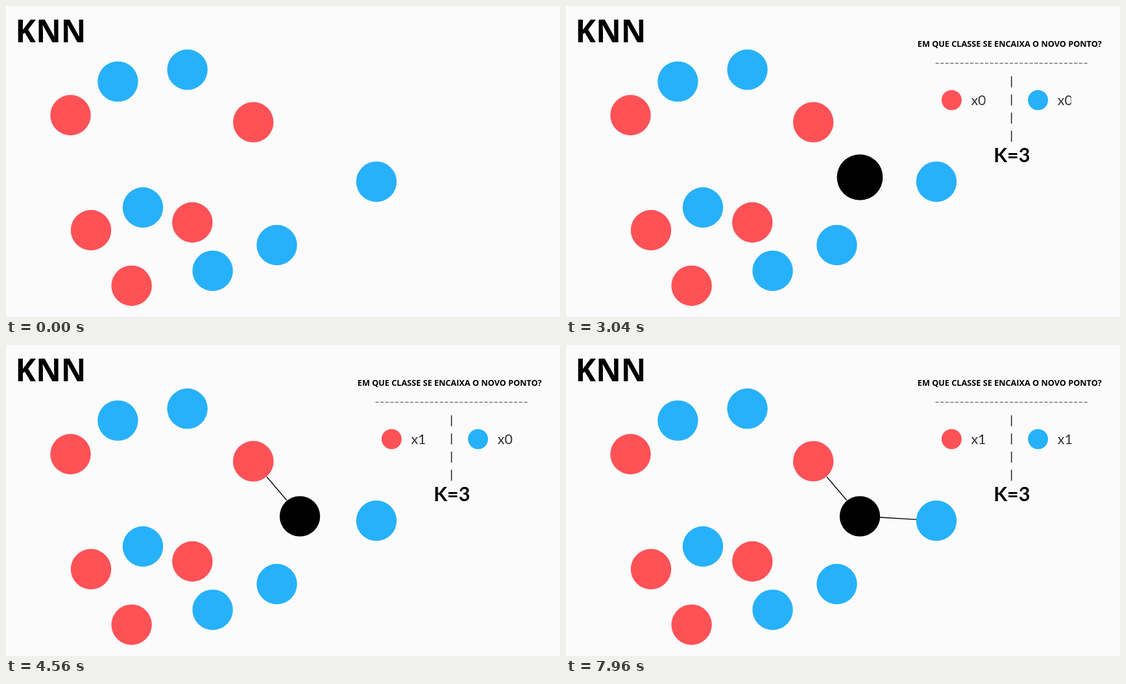
Recreate the animation shown at these times as an HTML page with a canvas. Size 854 by 480 pixels, loop 8 s.

```html
<!DOCTYPE html>
<html lang="pt">
<head>
<meta charset="utf-8">
<title>KNN</title>
<style>
html, body { margin: 0; width: 100%; height: 100%; overflow: hidden; background: #fbfbfb; }
canvas { display: block; }
</style>
</head>
<body>
<canvas id="stage" width="854" height="480"></canvas>
<script>
const ctx = document.getElementById('stage').getContext('2d');
const LOOP = 8000, R = 31.2, RED = '#ff5257', BLUE = '#27b1fb';
const ASK = 1920, FIRST = 4000, SECOND = 5920;
const reds = [[99.5, 168.5], [131, 346], [287.3, 334], [193.6, 431.7]];
const blues = [[172.4, 116.6], [279.6, 98.3], [211, 311], [318.6, 408.7], [417.5, 369]];

const clamp = v => Math.min(1, Math.max(0, v));
const easeOut = (t, start, length) => 1 - (1 - clamp((t - start) / length)) ** 3;

// Quick swell, then a decelerating return to the resting radius
function pulse(t, start) {
  const dt = t - start;
  if (dt < 0) return R;
  return R + 8.8 * (dt < 80 ? 0.5 + dt / 160 : (1 - clamp((dt - 80) / 560)) ** 2);
}

function disc(x, y, r, color) {
  ctx.fillStyle = color;
  ctx.beginPath();
  ctx.arc(x, y, r, 0, 7);
  ctx.fill();
}

function line(x1, y1, x2, y2, color, width, dash = []) {
  ctx.strokeStyle = color;
  ctx.lineWidth = width;
  ctx.setLineDash(dash);
  ctx.beginPath();
  ctx.moveTo(x1, y1);
  ctx.lineTo(x2, y2);
  ctx.stroke();
}

function text(str, x, y, font, align = 'left', color = '#000') {
  ctx.font = font;
  ctx.textAlign = align;
  ctx.fillStyle = color;
  ctx.fillText(str, x, y);
}

// Reveals a drawing from left to right
function wipe(t, start, x, width, paint) {
  if (t <= start) return;
  ctx.save();
  ctx.beginPath();
  ctx.rect(x, 0, width * easeOut(t, start, 1000), 480);
  ctx.clip();
  paint();
  ctx.restore();
}

const count = (n, x) => text('x' + n, x, 153, '21.5px Lato, sans-serif', 'center', '#333');

function panel(t) {
  text('EM QUE CLASSE SE ENCAIXA O NOVO PONTO?', 541.8, 63, 'bold 12.7px "Open Sans", sans-serif');
  text('K=3', 687.3, 241, 'bold 30.5px Lato, sans-serif', 'center');
  line(686.7, 108.5, 686.7, 209.5, '#333', 1.6, [17, 11]);
  wipe(t, 2110, 569.5, 235, () => line(569.5, 88.4, 804, 88.4, '#666', 1.4, [5.2, 2.43]));
  wipe(t, 2220, 578.5, 32, () => disc(594.4, 145.2, 15.5, RED));
  wipe(t, 2330, 711.8, 32, () => disc(727.6, 145.2, 15.5, BLUE));
  wipe(t, 2430, 623.5, 24.5, () => count(t < FIRST ? 0 : 1, 636));
  wipe(t, 2530, 757, 24.5, () => count(t < SECOND ? 0 : 1, 769.3));
}

function draw(t) {
  ctx.fillStyle = '#fbfbfb';
  ctx.fillRect(0, 0, 854, 480);
  text('KNN', 14.6, 56.3, 'bold 47.5px "Open Sans", sans-serif');
  reds.forEach(([x, y]) => disc(x, y, R, RED));
  blues.forEach(([x, y]) => disc(x, y, R, BLUE));
  disc(381.2, 179.4, pulse(t, FIRST), RED);
  disc(571, 271.2, pulse(t, SECOND), BLUE);
  if (t < ASK) return;

  disc(453, 264.4, t < FIRST ? R + 4.2 * easeOut(t, 2360, 680) : R, '#000');
  panel(t);
  if (t >= FIRST) line(402, 203.5, 433, 240, '#000', 1.3);
  if (t >= SECOND) line(484, 266, 540, 269.4, '#000', 1.3);
}

function frame() {
  draw(performance.now() % LOOP);
  requestAnimationFrame(frame);
}
frame();
</script>
</body>
</html>
```
